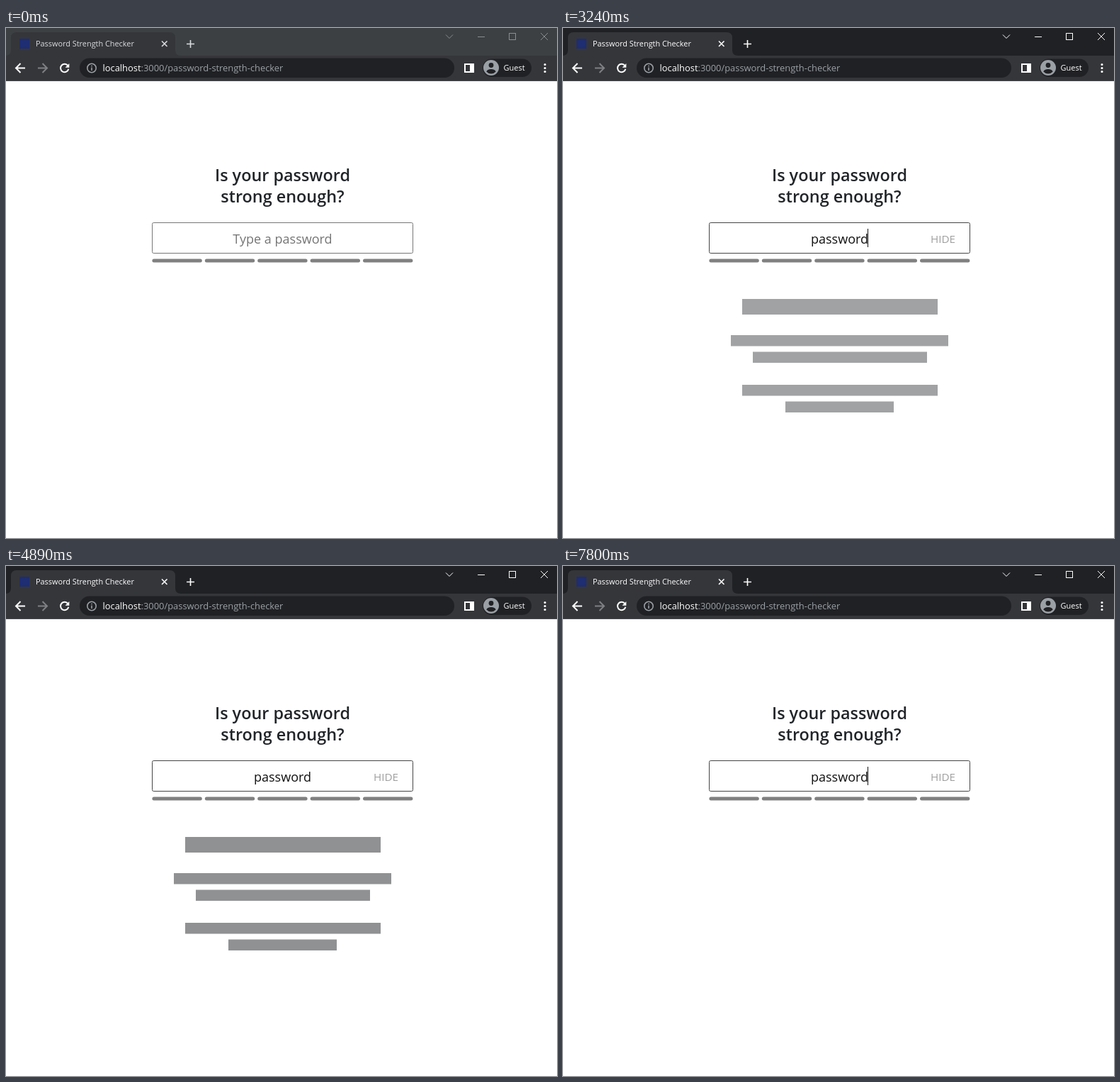
Animation of 778 by 719 pixels, one loop 8 s. Source, as an HTML page:

```html
<!DOCTYPE html>
<html lang="en">
<head>
<meta charset="utf-8">
<title>Password Strength Checker</title>
<style>
  html, body { margin: 0; width: 100%; height: 100%; overflow: hidden; background: #fff; }
  svg { display: block; width: 778px; height: 719px; font-family: "Open Sans", "Noto Sans", sans-serif;
        --title: #202124; --control: #fff; --tab: #fff; }
  svg.inactive { --title: #3c4043; --control: #8b8e91; --tab: #dadce0; }
  .line { fill: none; stroke-width: 1; }
  .bold { stroke-width: 1.6; }
  .icon { fill: none; stroke: #fff; stroke-width: 2; }
  .mid { text-anchor: middle; }
  .page { fill: #212529; }
  #field { font-size: 18px; }
</style>
</head>
<body>
<svg id="stage" viewBox="0 0 778 719">
  <!-- title bar -->
  <rect width="778" height="40" fill="var(--title)"/>
  <path d="M-1 39Q7 39 7 31V14Q7 6 15 6H231Q239 6 239 14V31Q239 39 247 39Z" fill="#35363a"/>
  <rect x="19" y="15" width="14" height="14" fill="#1f2d72"/>
  <text x="42" y="26" font-size="10.9" fill="var(--tab)">Password Strength Checker</text>
  <path d="M220 18.5l7.500 7.500M227.500 18.500l-7.500 7.500M255 22.500h11M260.500 17v11" class="line bold" stroke="var(--tab)"/>
  <g class="line" stroke="var(--control)">
    <path d="M621 9.5l5 5 5-5M666 12.5h10M755 7l10 10M765 7l-10 10"/>
    <rect x="710.5" y="7.5" width="9" height="9"/>
  </g>

  <!-- toolbar -->
  <rect y="39" width="778" height="35" fill="#35363a"/>
  <rect y="74" width="778" height="1" fill="#4a4c50"/>
  <path d="M27 56.5H14.5M20.5 50l-6.5 6.5 6.5 6.5" class="icon"/>
  <path d="M45 56.5H57.5M51.5 50l6.5 6.5-6.5 6.5" class="icon" style="stroke:#7f8083"/>
  <path d="M87.4 53.2A5.7 5.7 0 1 0 88.3 57.8" class="icon"/>
  <path d="M89.3 50v5.7h-5.7z" fill="#fff"/>
  <rect x="104" y="42.5" width="529" height="27.5" rx="13.75" fill="#202124"/>
  <circle cx="121" cy="56.5" r="6.2" class="line bold" stroke="#9aa0a6"/>
  <path d="M121 55.5v4.5M121 52.8v1.5" class="line bold" stroke="#9aa0a6"/>
  <text x="136.5" y="61" font-size="12.9" fill="#9aa0a6"><tspan fill="#fff">localhost</tspan>:3000/password-strength-checker</text>
  <rect x="648" y="51" width="12" height="11" class="icon"/>
  <rect x="655" y="51" width="5" height="11" fill="#fff"/>
  <rect x="673" y="43.5" width="69" height="25.5" rx="12.75" fill="#202124"/>
  <circle cx="685" cy="56" r="11" fill="#9aa0a6"/>
  <g fill="#202124">
    <circle cx="685" cy="52.5" r="3.4"/>
    <path d="M678.3 61.5Q679.5 58 685 58T691.7 61.5Q689 64.5 685 64.5T678.3 61.5Z"/>
  </g>
  <text x="702.5" y="60" font-size="11" fill="#fff">Guest</text>
  <path d="M761 51.5h0m0 5h0m0 5h0" stroke="#fff" stroke-width="3.2" stroke-linecap="round"/>

  <!-- page -->
  <g class="page mid" font-size="23.4" font-weight="600">
    <text x="390.5" y="216">Is your password</text>
    <text x="390.5" y="246">strong enough?</text>
  </g>
  <rect id="border" x="206.5" y="274.5" width="368" height="43" rx="2" fill="#fff"/>
  <rect id="selection" x="350" y="283" width="81" height="26" fill="#0078d7"/>
  <text id="field" class="mid" x="390.5" y="304"></text>
  <rect id="caret" y="283" width="1" height="26"/>
  <text id="hide" x="519" y="303" font-size="15.2" fill="#a0a0a0">HIDE</text>
  <g id="bars"></g>
  <g id="skeleton"></g>
  <g id="result" class="page mid" font-size="14.5">
    <text x="390.5" y="400" font-size="20" font-weight="600">Very weak</text>
    <text x="390.5" y="446">Your password can be guessed in under a second.</text>
    <text x="390.5" y="509">This is a top-10 common password.</text>
    <text x="390.5" y="533">Add another word or two.</text>
  </g>
</svg>
<script>
const LOOP = 8000, WORD = 'password', CENTER = 390.2;
const ACTIVE = 190, FOCUS = 370, CHECK = 2890, RATED = 5590, SELECT = 6260, CLEAR = 6530;
const BLINK = 550, PULSE = 2000;
const FIRST = { from: 1120, to: 2140, ease: 0.78 };
const SECOND = { from: 6930, to: 7800, ease: 1 };

const $ = id => document.getElementById(id);
const stage = $('stage'), field = $('field'), caret = $('caret');
const show = (id, on) => { $(id).style.display = on ? '' : 'none'; };

function addRect(parent, x, y, width, height, rx = 0) {
  const rect = document.createElementNS(stage.namespaceURI, 'rect');
  for (const [key, value] of Object.entries({ x, y, width, height, rx })) rect.setAttribute(key, value);
  $(parent).append(rect);
}

for (let i = 0; i < 5; i++) addRect('bars', 206.4 + i * 74.4, 325.5, 70.4, 5, 2.5);

// Placeholder lines: a heading, then two paragraphs of two lines, all centred.
const addLine = (width, y, height) => addRect('skeleton', Math.round(390.7 - width / 2), y, width, height);
addLine(276, 382, 22);
[[307, 246], [276, 153]].forEach((widths, p) =>
  widths.forEach((width, i) => addLine(width, 433 + p * 70 + i * 23.5, 15.5)));

function typed(t) {
  const { from, to, ease } = t < CLEAR ? FIRST : SECOND;
  if (t < from) return '';
  const progress = Math.min(1, (t - from) / (to - from));
  return WORD.slice(0, 1 + Math.floor((WORD.length - 1) * progress ** ease));
}

// The caret stays on while typing and blinks from the last activity.
function caretOn(t) {
  if (t < FOCUS) return false;
  if ([FIRST, SECOND].some(({ from, to }) => t >= from && t < to)) return true;
  const last = [FOCUS, FIRST.to, CLEAR, SECOND.to].findLast(time => time <= t);
  return (t - last) % (2 * BLINK) < BLINK;
}

function pulseGrey(t) {
  const wave = (1 - Math.cos((t - CHECK) / PULSE * 2 * Math.PI)) / 2;
  return Math.round(144 + 16.5 * Math.round(4 * wave));
}

function draw(t) {
  const text = typed(t), grey = pulseGrey(t);
  const selected = t >= SELECT && t < CLEAR, rated = t >= RATED && t < CLEAR;

  stage.classList.toggle('inactive', t < ACTIVE);
  $('border').setAttribute('stroke', t < FOCUS ? '#767676' : '#444');

  const label = text || 'Type a password';
  if (field.textContent !== label) field.textContent = label;
  field.setAttribute('fill', selected ? '#fff' : text ? '#111' : '#757575');
  show('selection', selected);
  show('hide', text);

  const width = text ? field.getComputedTextLength() : 0;
  caret.setAttribute('x', Math.floor(CENTER + width / 2));
  caret.setAttribute('fill', text ? '#111' : '#666');
  show('caret', caretOn(t));

  show('skeleton', t >= CHECK && t < RATED);
  $('skeleton').setAttribute('fill', `rgb(${grey},${grey + 1},${grey + 3})`);
  $('bars').setAttribute('fill', '#808080');
  $('bars').firstChild.setAttribute('fill', rated ? '#dc3545' : '#808080');
  show('result', rated);
}

const begin = performance.now();
function tick() {
  draw((performance.now() - begin) % LOOP);
  requestAnimationFrame(tick);
}
tick();
</script>
</body>
</html>
```
